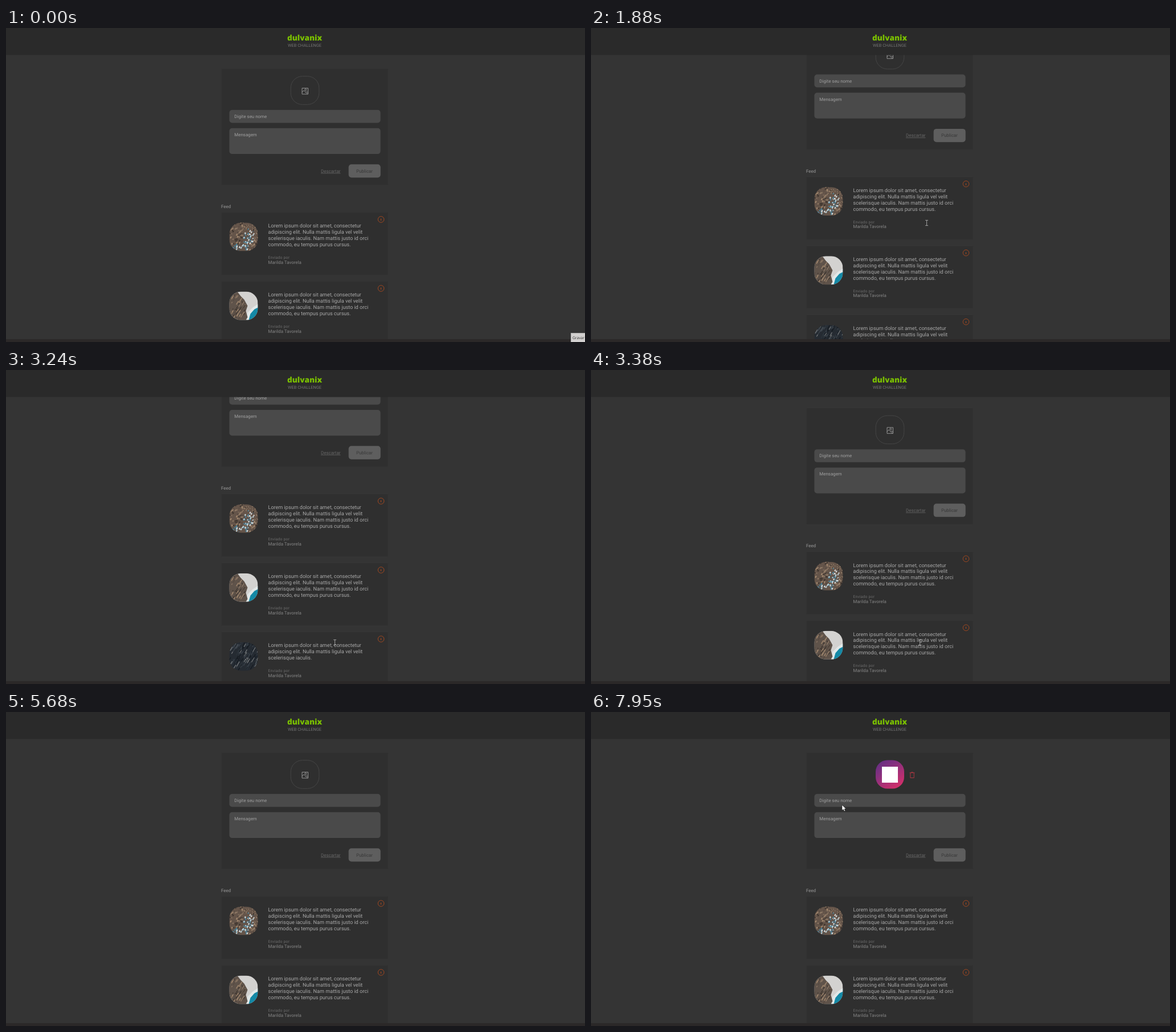
An HTML page for the animation above (8 s loop, 1015 by 551 pixels).

```html
<!DOCTYPE html>
<html lang="pt">
<head>
<meta charset="utf-8">
<title>Web challenge</title>
<style>
  html, body { margin: 0; width: 100%; height: 100%; overflow: hidden; background: #343434; }
  svg { display: block; width: 100%; height: 100%; }
  text { font: 7.93px Roboto, sans-serif; fill: #a0a0a0; text-rendering: geometricPrecision; white-space: pre; }
  .brand { font: 800 13.6px "Open Sans", sans-serif; fill: #7abf00; text-anchor: middle; }
  .sub { font-size: 7.42px; fill: #747474; text-anchor: middle; }
  .feed { font-weight: 500; fill: #858585; }
  .body { font-size: 9.08px; fill: #a8a8a8; }
  .by { font-size: 6.8px; letter-spacing: .17px; fill: #6c6c6c; }
  .name { fill: #858585; }
  .link { fill: #666; text-decoration: underline; }
  .btn { fill: #383838; }
  .x { font-size: 6.5px; fill: #ad4c22; text-anchor: middle; }
  .tip { font: 6.7px "Open Sans", sans-serif; fill: #333; }
  .card { fill: #2f2f2f; stroke: #393939; stroke-width: .7; }
  .field { fill: #4a4a4a; }
  .line { fill: none; stroke: #a0a0a0; stroke-width: .9; }
</style>
</head>
<body>
<svg viewBox="0 0 1015 551">
  <defs>
    <clipPath id="round"><rect width="50" height="50" rx="20.4"/></clipPath>
    <linearGradient id="pink" x1="0" y1="0" x2=".7" y2="1">
      <stop stop-color="#5c2d84"/><stop offset=".4" stop-color="#85307f"/><stop offset="1" stop-color="#d02f6b"/>
    </linearGradient>
  </defs>
  <g id="page"></g>
  <rect width="1015" height="47.5" fill="#2a2a2a"/>
  <text class="brand" x="523.5" y="22.3">dulvanix</text>
  <text class="sub" x="523.5" y="33">WEB CHALLENGE</text>
  <rect y="546" width="1015" height="5" fill="#2b2828"/>
  <g id="tip">
    <rect x="990.5" y="535.5" width="25" height="16" fill="#d2d0cf" stroke="#aaa"/>
    <text class="tip" x="993" y="546">Gravar</text>
  </g>
  <g id="cursor">
    <path id="arrow" d="M0 0V9.8L2.3 7.7 3.9 11.2 5.7 10.4 4.2 7H7.2Z" fill="#fff" stroke="#111" stroke-width=".6"/>
    <path id="beam" d="M-2.5-4.6H2.5M0-4.6V4.6M-2.5 4.6H2.5" fill="none" stroke="#b8b8b8" stroke-width=".8"/>
    <path id="hand" d="M-1 .8Q0-.6 1 .8V4.3L5 5.2Q6 5.5 6 6.6L5 12H-.6L-3 8Q-3.4 6.4-1 7.6Z" fill="#fff" stroke="#111" stroke-width=".6"/>
  </g>
</svg>
<script>
const $ = id => document.getElementById(id);
const show = (id, on) => $(id).style.display = on ? '' : 'none';
const rect = (x, y, w, h, cls, rx = 5) =>
  `<rect x="${x}" y="${y}" width="${w}" height="${h}" rx="${rx}" class="${cls}"/>`;
const text = (x, y, cls, s) => `<text x="${x}" y="${y}" class="${cls}">${s}</text>`;
const shape = (d, fill) => `<path d="${d}" fill="${fill}"/>`;

// Seeded short strokes; pick(x, y) gives the palette at a point
function grain(count, length, width, pick) {
  let seed = 7, out = '';
  const rnd = () => (seed = seed * 16807 % 2147483647) / 2147483647;
  for (let i = 0; i < count; i++) {
    const x = rnd() * 50, y = rnd() * 50, len = length * (.3 + rnd()), colours = pick(x, y);
    if (colours) out += `<path d="M${x} ${y}l${len * .6} ${-len}" stroke="${colours[i % colours.length]}" stroke-width="${width}"/>`;
  }
  return out;
}

const land = ['#8d7865', '#3b322c', '#a58a70', '#574a41'], sea = ['#b9cdd3', '#3f87a6', '#d8dcdc', '#4a5358'];
const slate = ['#14191f', '#3d454d', '#1d242c', '#777a7c', '#2c343c'];
const rocks = shape('M0 0H50V50H0Z', '#65554a')
  + grain(260, 2.5, 2, (x, y) => Math.hypot(x - 33, (y - 25) * .8) < 11 || x < 34 && y > 40 ? sea : land);
const coast = shape('M0 0H50V50H0Z', '#d3d2d0') + shape('M50 24L42 30 35 38 32 50H50Z', '#1489a6')
  + shape('M50 22L41 28 32 37 30 50H34L37 39 44 31 50 28Z', '#e2e8e8')
  + shape('M0 0H14L20 8 26 14 32 25 29 34 32 45 29 50H0Z', '#5f534a')
  + grain(160, 5, 1.3, (x, y) => x < 12 + y * .5 && x < 27 && land);
const cliff = shape('M0 0H50V50H0Z', '#252b32') + grain(150, 8, 1.2, () => slate);

const lines = ['Lorem ipsum dolor sit amet, consectetur', 'adipiscing elit. Nulla mattis ligula vel velit',
  'scelerisque iaculis. Nam mattis justo id orci', 'commodo, eu tempus purus cursus.'];
const short = [lines[0], lines[1], 'scelerisque iaculis.'];

function post([photo, rows], i) {
  const y = 323.3 + i * 121, end = y + 16.15 + rows.length * 10.85;
  return rect(377.4, y, 292.6, end - y + 51, 'card', 1.5)
    + `<g transform="translate(391.5 ${y + 18.2})" clip-path="url(#round)">${photo}</g>`
    + rows.map((s, k) => text(459.5, y + 27 + k * 10.85, 'body', s)).join('')
    + text(459.5, end + 22, 'by', 'Enviado por')
    + text(459.5, end + 30.8, 'name', 'Marilda Tavorela')
    + `<circle cx="657.4" cy="${y + 12.6}" r="5.3" fill="none" stroke="#a34820"/>`
    + text(657.4, y + 14.7, 'x', 'x');
}

$('page').innerHTML = rect(377.4, 71, 292.6, 205, 'card', 1.5)
  + `<g id="empty"><rect x="499.2" y="84.7" width="49.6" height="49.6" rx="20.4" fill="none" stroke="#4b4b4b" stroke-width=".8"/>
     <path class="line" d="M519 105.5H529.5V116H519ZM519 113L522 109.5 528.5 116M525.5 113L527 111.5 529.5 114"/>
     <circle class="line" cx="525.3" cy="108.3" r="1.5"/></g>
     <g id="chosen"><rect x="499" y="84.5" width="50" height="50" rx="20.4" fill="url(#pink)"/>
     <rect x="510" y="96" width="28" height="28" fill="#fff"/>
     <path d="M558.6 106.7H567.4M561.5 106.5V105.7H564.5V106.5M559.8 107V115.5H566.2V107" fill="none" stroke="#b93845" stroke-width=".9"/></g>`
  + rect(391.5, 143.8, 265, 22.7, 'field') + text(400.3, 158, '', 'Digite seu nome')
  + rect(391.5, 175.8, 265, 45.3, 'field') + text(400.3, 189.9, '', 'Mensagem')
  + text(552, 253.6, 'link', 'Descartar')
  + '<rect x="600.6" y="239.2" width="56" height="23.3" rx="5" fill="#5e5e5e"/>'
  + text(614, 253.6, 'btn', 'Publicar')
  + text(377, 316, 'feed', 'Feed')
  + [[rocks, lines], [coast, lines], [cliff, short]].map(post).join('');

// Number of evenly timed steps already shown at time t
const steps = (t, start, end, count) =>
  t < start ? 0 : Math.min(count, 1 + Math.floor((t - start) / (end - start) * (count - 1) + .01));

// Each move curves from the last position: start, end, steps, bend, goal
const moves = [
  [780, 1540, 12, [93, 133], [588.5, 342]],
  [2160, 2900, 11, [574, 395], [576.5, 478]],
  [3710, 4450, 12, [401, 280], [516.5, 127]],
  [4540, 4610, 2, [517, 124], [517, 121.5]],
  [4820, 5080, 4, [528, 113], [517.5, 121.5]],
  [5350, 5680, 6, [400, 140], [80, 216]],
  [7400, 7950, 9, [660, 370], [440, 163]]
];

function cursorAt(t) {
  let pos = [1105, 614];
  for (const [start, end, count, bend, goal] of moves) {
    const u = steps(t, start, end, count) / count, v = 1 - u;
    pos = pos.map((p, k) => v * v * p + 2 * u * v * bend[k] + u * u * goal[k]);
  }
  return pos;
}

function scrollAt(t) {
  const down = 1 - (1 - steps(t, 1810, 2350, 9) / 9) ** 2;
  const up = Math.max(0, steps(t, 3100, 3450, 6) - 1) / 5;
  return 157.7 * down * (1 - up ** 2.67) ** 4.4;
}

function cursorKind(x, y) {
  if (x > 499 && x < 549 && y > 84 && y < 135) return 'hand';
  const field = x > 391 && x < 656 && (y > 144 && y < 162 || y > 176 && y < 221);
  return field || x > 459 && x < 640 && y > 340 && y < 500 ? 'beam' : 'arrow';
}

function draw(now) {
  const t = now % 8000, [x, y] = cursorAt(t);
  $('page').setAttribute('transform', `translate(0 ${-scrollAt(t)})`);
  $('cursor').setAttribute('transform', `translate(${x} ${y})`);
  show('cursor', t >= 780 && t < 5680 || t >= 7400);
  for (const id of ['arrow', 'beam', 'hand']) show(id, id === cursorKind(x, y));
  show('empty', t < 6880);
  show('chosen', t >= 6880);
  $('tip').style.opacity = t < 70 ? 1 : t < 120 ? .4 : 0;
  requestAnimationFrame(draw);
}
draw(0);
</script>
</body>
</html>
```
